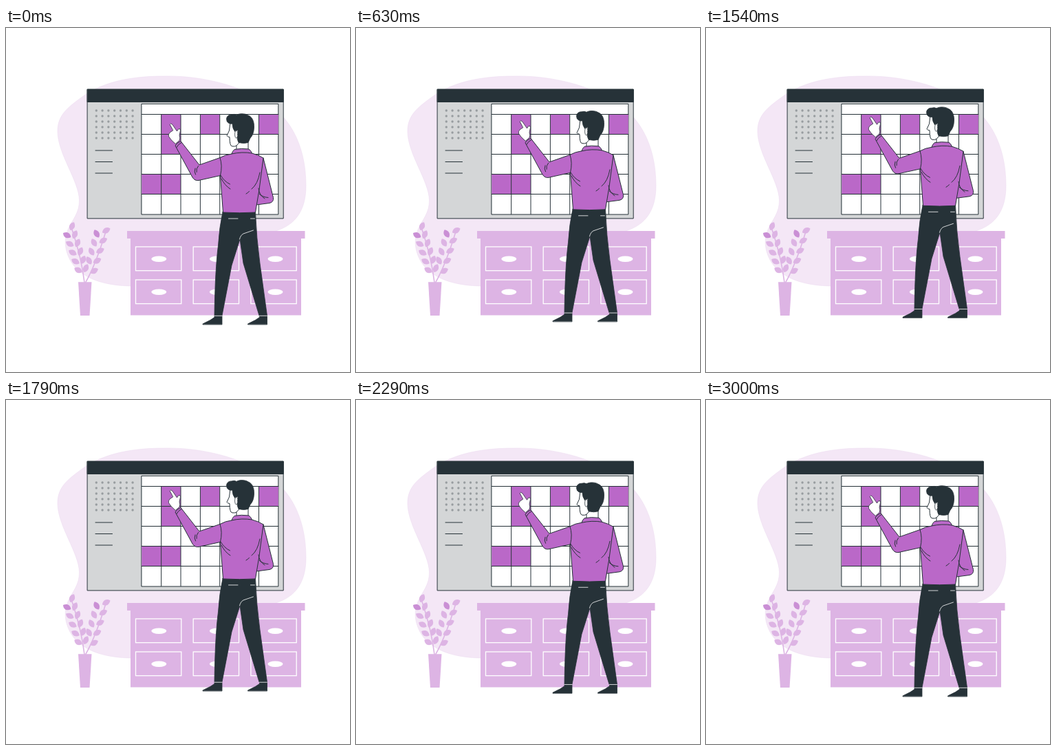
An HTML page that plays this animation: 500 px wide and 500 px high, repeating every 3.04 s.

```html
<!DOCTYPE html>
<html lang="en">
<head>
<meta charset="utf-8">
<title>Planning on a wall calendar</title>
<style>
  html, body { margin: 0; width: 100%; height: 100%; overflow: hidden; background: #fff; }
  svg { display: block; width: 100%; height: 100%; }
  .ink { stroke: #263238; stroke-width: 1; stroke-linejoin: round; stroke-linecap: round; }
  .thin { stroke-width: .8; }
  .line { fill: none; }
  .dark { fill: #263238; }
  .paper { fill: #fff; }
  .shirt { fill: #ba68c8; }
  .soft { fill: #ddb4e4; }
  .deep { fill: #ca8fd5; }
  .stem { fill: none; stroke: #ddb4e4; stroke-width: 1.6; }
  .seam { fill: none; stroke: #fff; stroke-width: .8; stroke-linecap: round; }
  .frame { fill: none; stroke: #fff; stroke-width: 1.3; }
</style>
</head>
<body>
<svg viewBox="0 0 500 500">
  <path id="blob" fill="#f4e7f6" stroke="#ead9ee" stroke-width=".5" d="M230 70C277 69 326 80 362 99C412 122 436 170 436 229C436 265 421 285 395 294C340 312 275 375 184 375C145 375 112 365 96 342C86 327 83 309 90 293C96 279 107 269 106.500 250C106 222 75 183 75 150C75 124 93 113 118 95C151 75 191 70 230 70Z"/>

  <g id="board">
    <rect class="ink" x="118.500" y="89.200" width="284.700" height="187.700" fill="#d4d6d7"/>
    <rect class="ink dark" x="118.500" y="89.200" width="284.700" height="18.300"/>
  </g>

  <g id="cabinet">
    <path class="soft" d="M176 295H434.500V306H429V417.500H181V306H176Z"/>
  </g>

  <g id="plant">
    <path class="stem" d="M114 370Q110 335 96 293M115.500 370Q130 345 145 296"/>
    <path class="soft" d="M105 369.300H124.500L121.500 418H108Z"/>
  </g>

  <g id="man">
    <path class="ink thin dark" d="M315 267.500H362.500Q364 305 369 342L379.500 418H368L345 342L340 307L328 345L314 418H303Q304 350 308.500 316Q310 290 315 267.500Z"/>
    <g id="feet"></g>
    <path class="seam" d="M323.500 277H337M355.500 277H361.500M339.500 307Q341 301 345 299L359.500 294"/>

    <path class="ink paper" d="M335 164V180H352V162Z"/>
    <path class="ink paper" d="M326 137L324.500 149L321 156.500Q322 158.500 325 158.500Q325 172 329 172Q333 172.500 335 171L345 160V137Z"/>
    <path class="ink thin dark" d="M321.500 136C318.500 130 323 125.500 328 126Q332 124.500 335 126.500C340 123.500 349 124.500 352 127C358 129 361 136 360.500 145Q360 155 355 160L352 166.500Q346 168.500 338 166.500Q335 161 337 155V148L333 151Q329 146 329 139Q324 140 321.500 136Z"/>
    <ellipse class="ink thin paper" cx="334.700" cy="154.500" rx="2.100" ry="5.500"/>

    <path class="ink shirt" d="M374 189L388.500 246.500Q389.500 253 383 254.500L364 257Z"/>
    <path class="ink shirt" d="M311 188.500Q319 184 328 183Q329 179 332 176.500Q342 174.500 353 176Q356 178 357.500 182Q367 184.500 374 189L368 235L362.500 268Q340 269.500 315.500 268L311.500 215Z"/>
    <path class="ink shirt" d="M311 188.500L281 199L254 164.500Q249 166 246 171L271 217Q274.500 222.500 280 221.500L311.500 214.500Q315 200 311 188.500Z"/>
    <path class="ink thin paper" d="M238.300 140Q239.500 137.500 242 140.500L248.500 150L251 146.500Q253.500 146 253.500 149L252 156Q253.500 160 252 163.500L246.300 168.500L240 162.500L236.500 157.500Q235.500 155 238 152L242.500 149Z"/>
  </g>
</svg>
<script>
  const NS = "http://www.w3.org/2000/svg";
  const byId = id => document.getElementById(id);

  function add(parent, tag, cls, attrs) {
    const el = document.createElementNS(NS, tag);
    el.setAttribute("class", cls);
    for (const key in attrs) el.setAttribute(key, attrs[key]);
    byId(parent).appendChild(el);
  }
  const path = (parent, cls, d) => add(parent, "path", cls, { d });

  // Calendar page; "#" marks a booked day
  const LEFT = 197.3, TOP = 125.5, COL = 28.36, ROW = 29;
  const width = 7 * COL, bottom = TOP + 5 * ROW;
  add("board", "rect", "ink paper", { x: LEFT, y: 110.3, width, height: bottom + .5 - 110.3 });
  [" # #  #", " #", "", "##"].forEach((week, r) => [...week].forEach((day, c) => {
    if (day === "#")
      add("board", "rect", "shirt", { x: LEFT + c * COL, y: TOP + r * ROW, width: COL, height: ROW });
  }));
  for (let r = 0; r < 5; r++) path("board", "ink line", `M${LEFT} ${TOP + r * ROW}h${width}`);
  for (let c = 1; c < 7; c++) path("board", "ink line", `M${LEFT + c * COL} ${TOP}V${bottom}`);

  // Side panel
  for (let i = 0; i < 42; i++)
    add("board", "circle", "", { cx: 131.3 + i % 7 * 8.8, cy: 120 + Math.floor(i / 7) * 8, r: 1.7, fill: "#989da0" });
  for (let i = 0; i < 3; i++) path("board", "ink line", `M130 ${178 + i * 16.5}h24.5`);

  // Drawers
  for (let c = 0; c < 3; c++)
    for (let r = 0; r < 2; r++) {
      const y = 318 + r * 48;
      add("cabinet", "rect", "frame", { x: 188.5 + c * 83.7, y, width: 66.3, height: 34.7 });
      add("cabinet", "ellipse", "paper", { cx: 222.3 + c * 84.6, cy: y + 17.7, rx: 11, ry: 4.2 });
    }

  // A row of leaves climbing one side of a stem
  function leaves(count, x, y, dx, dy, tilt) {
    for (let i = 0; i < count; i++) {
      const tip = tilt < 0 && i === count - 1;
      add("plant", "path", tip ? "deep" : "soft", {
        d: "M0 6.500C-5 3 -5.500 -3 .5 -6.500C5.500 -2 5 3 0 6.500Z",
        transform: `translate(${x + i * dx} ${y + i * dy}) rotate(${tilt})`
      });
    }
  }
  leaves(5, 105, 352, -4.1, -12.7, -64);
  leaves(6, 116, 349, -4, -12.2, 22);
  leaves(4, 120.5, 338, 3.7, -13, -32);
  leaves(5, 128, 353, 4.4, -14.7, 60);

  // Shoes
  for (const x of [286, 351.5]) {
    path("feet", "ink thin dark", `M${x} 430.700V430L${x + 11} 424.500L${x + 17} 420.500V418H${x + 28}V430.700Z`);
    path("feet", "seam", `M${x + 17} 418.300h11`);
  }

  // Creases: start, bend, end
  const crease = (x, y, bx, by, ex, ey) => path("man", "ink line", `M${x} ${y}q${bx} ${by} ${ex} ${ey}`);
  crease(328, 183, 15, -3.5, 29.5, -1);
  crease(248, 173.5, 2, -4.5, 7, -7);
  crease(279.5, 200.5, -3.5, 4, -2.5, 9);
  crease(275, 204, -2, 5, .5, 9);
  crease(312, 214, 5, 9, 13.5, 13);
  crease(313, 219, 5, 10, 13, 15);
  crease(369, 210, -3, 17, -12, 24);
  crease(353.5, 237.5, -2, 2, -4.5, 3.5);
  crease(367, 233, 1, 10, 9, 15);
  crease(368, 241, 5, 5, 13, 5.5);

  // The man rises and sinks evenly at 24 steps per second
  const LOOP = 3040, STEP = 1000 / 24, HALF = 36, RISE = 10;
  function draw() {
    const t = performance.now() % LOOP;
    const n = Math.min(2 * HALF, Math.floor((t + 3) / STEP));
    const lift = RISE * (1 - Math.abs(n - HALF) / HALF);
    byId("man").setAttribute("transform", `translate(0 ${-lift})`);
    requestAnimationFrame(draw);
  }
  draw();
</script>
</body>
</html>
```
